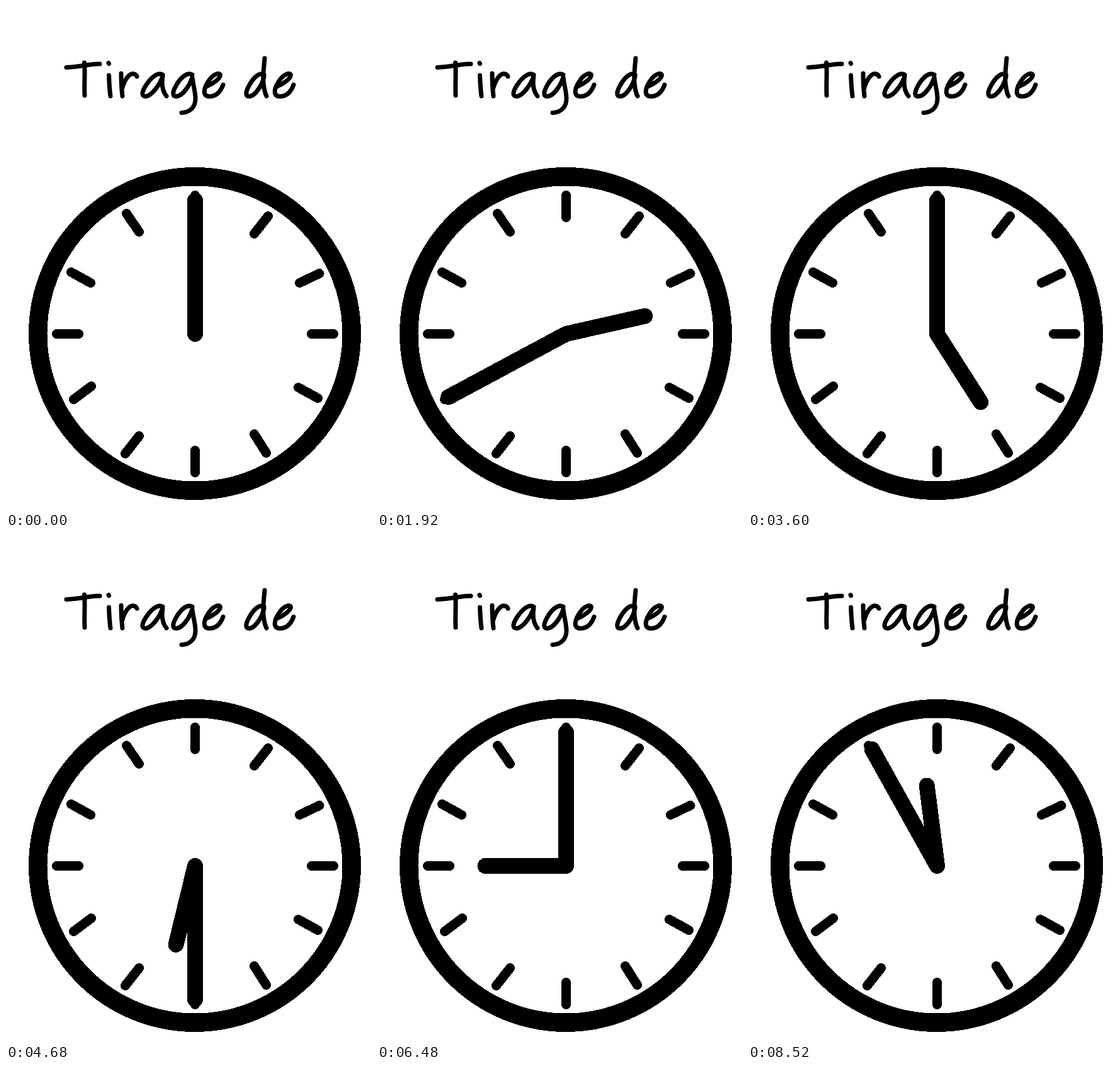
Animation of 580 by 800 pixels, one loop 8580 ms. Source, as an HTML page:

```html
<!DOCTYPE html>
<html lang="fr">
<head>
<meta charset="utf-8">
<title>Tirage de</title>
<style>
  html, body { margin: 0; width: 100%; height: 100%; overflow: hidden; background: #fff; }
  svg { position: absolute; left: 0; top: 0; width: 580px; height: 800px; }
  h1 {
    position: absolute; left: 92px; top: 74px; margin: 0;
    font: 400 80px/1 Lato, sans-serif; color: transparent;
  }
  path, line, circle { fill: none; stroke: #000; stroke-linecap: round; stroke-linejoin: round; }
  .clock { shape-rendering: crispEdges; }
  .rim { stroke-width: 29.5; }
  .ticks { stroke-width: 15; }
  .hand { stroke-width: 25; }
  .lettering { stroke-width: 7; }
</style>
</head>
<body>
<h1>Tirage de</h1>
<svg viewBox="0 0 580 800" aria-hidden="true">
  <!-- handwritten title -->
  <g class="lettering">
    <path d="M96 97.5C106 97 121 95 131 93.5S143 91.5 149 92"/>
    <path d="M124.500 90C126 105 124 126 125 142"/>
    <path d="M163 90.5L163.5 91.5M163.5 110C164 122 164.500 133 166 143"/>
    <path d="M183 107C183 119 183.500 131 185 143M184.500 131C188 118 195 108 201 107.500C205 107.500 207 109 208 112"/>
    <path d="M249 109C240 104 229 116 223 125C215 137 215 143.500 222 143.500C232 142.500 245 124 249 111C247 124 249 136 255 143"/>
    <path d="M296 109C287 104 277 115 271 125C264 137 264 143.500 271 143.500C281 142.500 292 126 296 113C297 124 301 136 301 147C301 160 293 169 279 169.500"/>
    <path id="e" d="M318 128C330 123 340 115 340.500 110C340 104.500 330 108 324 116C314 129 311 143.500 323 143.500C334 143.500 341 136 345 125"/>
    <path d="M410 109C402 104 392 116 387 125C380 137 380 143.500 387 143.500C396 142.500 407 126 410 112M411 83C410 95 408 108 409 122C410 131 411 138 414 143"/>
    <use href="#e" x="112"/>
  </g>

  <g class="clock">
    <circle class="rim" cx="300" cy="520" r="249.25"/>
    <path class="ticks" d="M300.500 300.500V335.500M416.500 333.500L394.500 361.500M498 424.500L466.500 439.500
      M520.500 520.500H485.500M495.500 622.500L464.500 605.500M413.500 709.500L394.500 679.500M300.500 740.500V705.500
      M189.500 710.500L211.500 682.500M107.500 624.500L135.500 603.500M80.500 520.500H115.500
      M103.500 422.500L134.500 439.500M191.500 329.500L211.500 358.500"/>
    <line class="hand" id="hour" x1="300.5" y1="520.5" x2="300.5" y2="392"/>
    <line class="hand" id="minute" x1="300.5" y1="520.5" x2="300.5" y2="308.5"/>
  </g>
</svg>
<script>
  const STEP = 60, COUNT = 143;
  const SKIP = 118; // one five-minute position is passed over here

  // Slightly uneven, hand-placed dial angles in degrees
  const minuteMarks = [0, 31.7, 64.1, 90, 117.6, 149.1, 180, 210.3, 241.8, 270, 296.5, 330.8];
  const hourMarks = [0, 31.5, 64.5, 90, 117.6, 147.4, 180, 207.4, 242, 270, 296.5, 330.8, 360];

  const hourHand = document.getElementById('hour');
  const minuteHand = document.getElementById('minute');
  const turn = (hand, angle) => hand.setAttribute('transform', `rotate(${angle} 300.5 520.5)`);

  function draw(now) {
    const index = Math.floor(now / STEP) % COUNT;
    const fives = index < SKIP ? index : index + 1;
    const hour = Math.floor(fives / 12);
    const mark = fives % 12;

    // The hour hand moves only every quarter of an hour
    const part = Math.floor(mark / 3) / 4;
    turn(hourHand, hourMarks[hour] + part * (hourMarks[hour + 1] - hourMarks[hour]));
    turn(minuteHand, minuteMarks[mark]);
  }

  const start = performance.now();
  function tick() {
    draw(performance.now() - start);
    requestAnimationFrame(tick);
  }
  tick();
</script>
</body>
</html>
```
